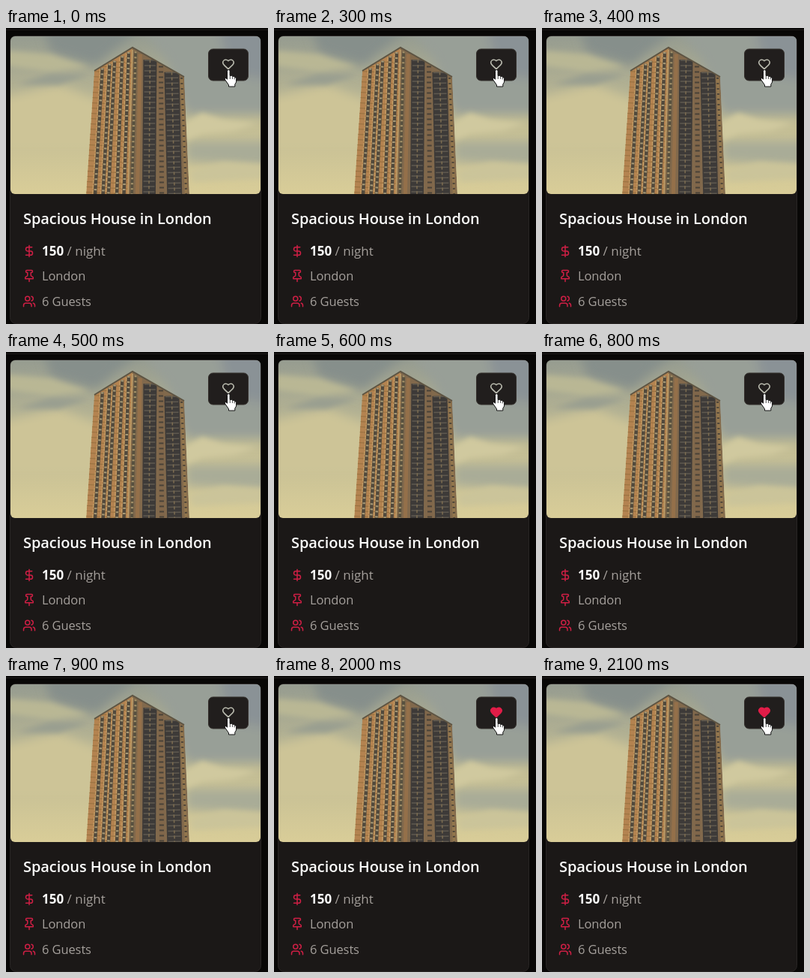
These frames come from a looping animation (350 by 394 pixels, 2900 ms). An HTML page:

```html
<!DOCTYPE html>
<html lang="en">
<head>
<meta charset="utf-8">
<style>
  html, body { margin: 0; width: 100%; height: 100%; overflow: hidden; background: #080706; }
  svg { display: block; width: 350px; height: 394px; font: 16.5px "Open Sans", "Noto Sans", sans-serif; }
  .icon { fill: none; stroke: #cf1f45; stroke-width: 2; stroke-linecap: round; stroke-linejoin: round; }
  .title { font-size: 20px; font-weight: 600; letter-spacing: -.07px; fill: #fafaf9; }
  .price { font-weight: 700; fill: #fafaf9; }
  .info { fill: #a5a09c; letter-spacing: -.1px; }
  .rate { font-size: 17px; letter-spacing: 0; }
  #heart { stroke: #b9baae; stroke-width: 2.3; }
  #heart.liked { fill: #e11d48; stroke: #e11d48; }
</style>
</head>
<body>
<svg viewBox="0 0 350 394">
  <defs>
    <linearGradient id="sky" x2="0" y2="1">
      <stop offset="0" stop-color="#969c90"/>
      <stop offset=".45" stop-color="#bdb994"/>
      <stop offset="1" stop-color="#d9cd98"/>
    </linearGradient>
    <filter id="soft" x="-50%" y="-50%" width="200%" height="200%"><feGaussianBlur stdDeviation="7"/></filter>
    <filter id="wisp" x="-50%" y="-50%" width="200%" height="200%"><feGaussianBlur stdDeviation="3.5"/></filter>
    <clipPath id="photo"><rect x="6" y="11" width="334" height="210" rx="6"/></clipPath>
    <clipPath id="tower"><path d="M169 26 238 65 245 222H107L118 57Z"/></clipPath>
  </defs>

  <path d="M0 2.500H350" stroke="#1d1a19"/>
  <rect x="5.500" y="10.500" width="335" height="383" rx="8" fill="#1b1817" stroke="#292524"/>

  <g clip-path="url(#photo)">
    <rect x="6" y="11" width="334" height="210" fill="url(#sky)"/>
    <g filter="url(#soft)">
      <path d="M50 0H180L120 50 60 32Z" fill="#868f8b"/>
      <path d="M-10 95 70 75 130 100V160H-10Z" fill="#cdc497"/>
      <path d="M180 0H360V115H240L215 45Z" fill="#989f97"/>
      <path d="M285 0H360V70L300 60Z" fill="#8a9296"/>
      <path d="M240 150H360V185L240 178Z" fill="#a9ac97"/>
    </g>
    <g filter="url(#wisp)">
      <path d="M0 30 60 35 110 52 60 58 0 50Z" fill="#b9b794"/>
      <path d="M15 75 60 60 112 62 70 76Z" fill="#9a9f90"/>
      <path d="M236 128 262 113 290 122 335 127 305 137 262 141 240 150Z" fill="#d0c99f"/>
      <path d="M245 190 290 178 345 182V200L250 205Z" fill="#cbc49a"/>
    </g>
    <g id="facade" clip-path="url(#tower)" fill="none">
      <path d="M169 26 118 57 107 222H163Z" fill="#b48350"/>
      <path d="M169 26 238 65 245 222H163Z" fill="#81694c"/>
    </g>
    <path d="M118 57 169 26 238 65" fill="none" stroke="#5d5443" stroke-width="2"/>
  </g>

  <rect x="270.500" y="28" width="53" height="42" rx="6" fill="#211e1d" stroke="#35302d"/>
  <path id="heart" class="icon" transform="translate(288.200 40.300) scale(.73 .68)" d="M19 14c1.490-1.460 3-3.210 3-5.500A5.500 5.500 0 0 0 16.500 3c-1.760 0-3 .5-4.500 2-1.500-1.500-2.740-2-4.500-2A5.500 5.500 0 0 0 2 8.500c0 2.300 1.500 4.050 3 5.500l7 7Z"/>
  <path d="M295.500 57.500q0-2 1.800-2t1.800 2v6q3-1 3.500 1 2.300-.7 2.800 1 2-.2 2.200 2v4.500l-1.800 3v3h-8.300v-2.200l-4.800-6.800q-1-2 .6-2.300 1.200 0 2.200 1.600Z" fill="#fff" stroke="#111"/>
  <path d="M299.300 64v4M302.400 65v3M305.200 66v2.500" stroke="#222" stroke-width=".8"/>

  <text class="title" x="23" y="261">Spacious House in London</text>
  <text class="info rate" x="48" y="303"><tspan class="price">150</tspan> / night</text>
  <text class="info" x="48" y="336">London</text>
  <text class="info" x="48" y="370">6 Guests</text>

  <path class="icon" transform="translate(22 288) scale(.75)" d="M12 2v20M17 5H9.500a3.500 3.500 0 0 0 0 7h5a3.500 3.500 0 0 1 0 7H6"/>
  <path class="icon" transform="translate(22 321) scale(.75)" d="M12 17v5M5 17h14v-1.760a2 2 0 0 0-1.110-1.790l-1.780-.9A2 2 0 0 1 15 10.760V6h1a2 2 0 0 0 0-4H8a2 2 0 0 0 0 4h1v4.760a2 2 0 0 1-1.110 1.790l-1.780.9A2 2 0 0 0 5 15.240Z"/>
  <path class="icon" transform="translate(22 355) scale(.75)" d="M16 21v-2a4 4 0 0 0-4-4H6a4 4 0 0 0-4 4v2M13 7a4 4 0 1 1-8 0 4 4 0 0 1 8 0M22 21v-2a4 4 0 0 0-3-3.870M16 3.130a4 4 0 0 1 0 7.750"/>
</svg>
<script>
  const LOOP = 2900, LIKED_AT = 2000;
  const facade = document.getElementById('facade');
  const heart = document.getElementById('heart');
  const mix = (a, b, u) => a + (b - a) * u;

  // Each face: outer top x, y and outer bottom x; both meet at the corner edge.
  const left = [118, 57, 107], right = [238, 65, 245];

  function column([topX, topY, bottomX], u, width, color, dash = '') {
    const line = document.createElementNS('http://www.w3.org/2000/svg', 'path');
    line.setAttribute('d', `M${mix(169, topX, u)} ${mix(26, topY, u) + 3}L${mix(163, bottomX, u)} 226`);
    line.setAttribute('stroke', color);
    line.setAttribute('stroke-width', width);
    line.setAttribute('stroke-dasharray', dash);
    facade.append(line);
  }

  function windows(face, u, width, wall, pane) {
    column(face, u, width, wall);
    column(face, u, width - 1, pane, '2 5');
  }

  column(left, .5, 60, '#96703f', '1 6');
  for (const u of [.1, .27, .47, .6, .79]) {
    windows(left, u, 4.5, '#51493c', '#a89a76');
    column(left, u + .06, 1, '#c9a56c', '5 2');
  }
  windows(right, .06, 4, '#57503f', '#a8946a');
  column(right, .15, 5, '#94704a');
  for (const [u, width] of [[.34, 18], [.76, 20]]) {
    column(right, u, width, '#3d3a38');
    column(right, u, width - 3, '#5f594f', '1.5 5.5');
    column(right, u, 1.5, '#7d6d51', '4 3');
  }
  windows(right, .55, 7, '#80664a', '#494238');
  windows(right, .95, 4, '#92764d', '#51473a');
  column(right, 0, 1.5, '#c0a06a');

  function draw(now) {
    heart.classList.toggle('liked', now % LOOP >= LIKED_AT);
    requestAnimationFrame(draw);
  }
  requestAnimationFrame(draw);
</script>
</body>
</html>
```
